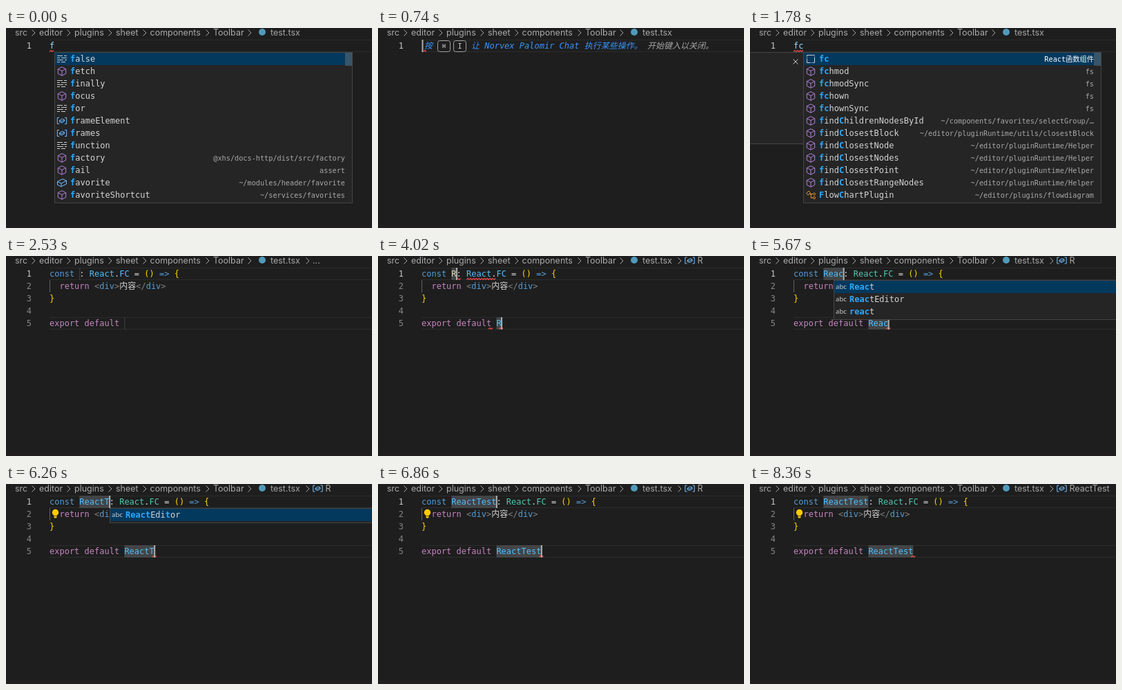
Write an HTML page that moves like this. It is 530 px wide and 291 px high and loops after 8.38 s.

```html
<!DOCTYPE html>
<html lang="zh">
<head>
<meta charset="utf-8">
<title>Snippet completion</title>
<style>
html, body { margin: 0; width: 100%; height: 100%; overflow: hidden; background: #1e1e1e; }
svg { display: block; width: 530px; height: 291px; }
text { white-space: pre; font: 12px "DejaVu Sans Mono", "Noto Sans CJK SC", "Noto Sans CJK", monospace; fill: #d4d4d4; }
.crumb { font: 12.5px Inter, "Open Sans", sans-serif; fill: #a9a9a9; }
.detail { font-size: 10.23px; text-anchor: end; fill: #a8a8a8; }
.abc { font: 9.6px "Noto Sans", sans-serif; fill: #ccc; }
.key { font-size: 10px; text-anchor: middle; fill: #ccc; }
.hint { font-style: italic; }
.match { font-weight: bold; fill: #2aaaff; }
.num { text-anchor: end; }
path { fill: none; }
</style>
</head>
<body>
<svg id="stage" viewBox="0 0 530 291"></svg>
<script>
const CH = 7.224, LEFT = 63, LOOP = 8380;
const BLUE = '#569cd6', CONST = '#4fc1ff', TYPE = '#4ec9b0', PINK = '#c586c0',
      GOLD = '#ffd700', GREY = '#808080', PLAIN = '#d4d4d4';

const lineY = line => 17 + 18 * (line - 1);
const rect = (x, y, w, h, fill, more = '') =>
  `<rect x="${x}" y="${y}" width="${w}" height="${h}" fill="${fill}" ${more}/>`;
const path = (d, color, more = '') => `<path d="${d}" stroke="${color}" ${more}/>`;
const esc = s => s.replace(/&/g, '&amp;').replace(/</g, '&lt;');
const text = (x, y, s, cls = '', fill = '') =>
  `<text x="${x}" y="${y}" class="${cls}" ${fill && `style="fill:${fill}"`}>${esc(s)}</text>`;
const spans = (line, parts) => `<text x="${LEFT}" y="${lineY(line) + 13}">` +
  parts.map(([s, c]) => `<tspan fill="${c}">${esc(s)}</tspan>`).join('') + '</text>';
const cursor = (x, line) => rect(x - .5, lineY(line), 2, 18, '#aeafad');

function squiggle(x1, x2, line) {
  let d = '';
  for (let x = x1, i = 0; x <= x2; x += 2, i++)
    d += `${i ? 'L' : 'M'}${x} ${lineY(line) + (i % 2 ? 15.5 : 17.5)}`;
  return path(d, '#f14c4c', 'stroke-width="1.1"');
}

// Icons are drawn around their centre.
const icons = {
  keyword: path('M-7-4.5h8M3-4.5h4M-7-1.5h4M-1-1.5h8M-7 1.5h9M4 1.5h3M-7 4.5h4M-1 4.5h6', '#ccc'),
  cube: path('M0-6.3L5.7-3.4V3.4L0 6.3-5.7 3.4V-3.4ZM-5.7-3.4L0-.5 5.7-3.4M0-.5V6.3', '#b180d7'),
  field: path('M-6.5-1.5L1-5.3 6.5-2.8V2L-1 5.7-6.5 3.2ZM-6.5-1.5L-1 1.2 6.5-2.8M-1 1.2V5.7', '#75beff'),
  variable: path('M-4-4.5H-6.7V4.5H-4M4-4.5H6.7V4.5H4M-3.5-.3L.5-2.8 3.5-1.4V.8L-.5 3-3.5 1.6ZM-3.5-.3L-.5 1 3.5-1.4', '#75beff'),
  snippet: path('M-5.5-5.5H5.5V5.5H-5.5Z', '#ccc', 'stroke-dasharray="9 0 2 1 1 1"'),
  class: path('M-6.5-2.5L-3-5.8-.3-3.2-3.8 0ZM-2-1.5H3M.3-1.5V4H3M3-1.5L5-3.3 7-1.4 5 .5ZM3 4L5 2.2 7 4.1 5 6Z', '#ee9d28')
};
const icon = (name, x, y) => name === 'abc'
  ? text(x - 8, y + 3, 'abc', 'abc')
  : `<g transform="translate(${x} ${y})">${icons[name]}</g>`;

// Labels mark the matched letters with asterisks.
function popup(x, items) {
  const h = items.length * 18;
  let s = rect(x, 35.5, 431, h + 3, '#252526', 'stroke="#454545"') + rect(x + .5, 36, 430, 18, '#04395e');
  items.forEach(([kind, label, detail], i) => {
    const y = 45 + 18 * i;
    s += icon(kind, x + 10.5, y) + `<text x="${x + 22.5}" y="${y + 4}">` +
      label.split('*').map((p, j) => `<tspan class="${j % 2 ? 'match' : ''}">${p}</tspan>`).join('') + '</text>';
    if (detail) s += text(x + 420.5, y + 3.5, detail, 'detail', i ? '' : '#fff');
  });
  return s;
}
const slider = (x, opacity) => rect(x + 420.5, 36, 10, 19, '#797979', `opacity="${opacity}"`);

const rows = (kind, list) => list.split(' ').map(label => [kind, label]);

const fItems = [
  ['keyword', '*f*alse'], ['cube', '*f*etch'], ['keyword', '*f*inally'], ['cube', '*f*ocus'],
  ['keyword', '*f*or'], ['variable', '*f*rameElement'], ['variable', '*f*rames'], ['keyword', '*f*unction'],
  ['cube', '*f*actory', '@xhs/docs-http/dist/src/factory'], ['cube', '*f*ail', 'assert'],
  ['field', '*f*avorite', '~/modules/header/favorite'], ['cube', '*f*avoriteShortcut', '~/services/favorites']
];
const helper = '~/editor/pluginRuntime/Helper';
const fcItems = [
  ['snippet', '*fc*', 'React函数组件'],
  ...['hmod', 'hmodSync', 'hown', 'hownSync'].map(s => ['cube', '*fc*' + s, 'fs']),
  ['cube', '*f*ind*C*hildrenNodesById', '~/components/favorites/selectGroup/…'],
  ['cube', '*f*ind*C*losestBlock', '~/editor/pluginRuntime/utils/closestBlock'],
  ...['Node', 'Nodes', 'Point', 'RangeNodes'].map(s => ['cube', '*f*ind*C*losest' + s, helper]),
  ['class', '*F*low*C*hartPlugin', '~/editor/plugins/flowdiagram']
];
const reItems = rows('abc', '*Re*act *Re*actEditor *Re*cord *Re*nder *Re*nderPlugin *Re*quired ' +
  '*re*act *re*ad *re*ason *re*covery *re*coverySheet *re*coverySheetFromLocalSnapshot');
const reaItems = rows('abc', '*Rea*ct *Rea*ctEditor *rea*ct *rea*d *rea*son');
const reacItems = rows('abc', '*Reac*t *Reac*tEditor *reac*t');
const reactItems = rows('abc', '*React* *React*Editor *react*');
const tItems = rows('abc', '*React*Edi*t*or');

function frame(body, lines, active, crumb) {
  let s = rect(0, 0, 530, 291, '#1e1e1e') + rect(0, 286, 530, 5, '#211e1f');
  const names = { src: 13, editor: 48, plugins: 99, sheet: 159, components: 208.5, Toolbar: 300, 'test.tsx': 383 };
  for (const n in names) s += text(names[n], 11, n, 'crumb');
  const arrows = [40, 91, 151, 201, 292, 353];
  if (crumb) arrows.push(437);
  for (const x of arrows) s += path(`M${x - 2.5} 2.5l4.5 4.5-4.5 4.5`, '#a9a9a9');
  s += '<circle cx="371" cy="6" r="5" fill="#519aba"/>';
  if (crumb === '…') s += text(444, 11, '...', 'crumb');
  else if (crumb) s += icon('variable', 451.5, 6.5) + text(462.5, 11, crumb, 'crumb');
  for (const n of active)
    s += path(`M${LEFT} ${lineY(n) + .5}H530M${LEFT} ${lineY(n) + 17.5}H530`, '#2c2c2c');
  for (let n = 1; n <= lines; n++)
    s += text(37, lineY(n) + 13, String(n), 'num', n === 1 ? '#c6c6c6' : '#858585');
  return s + body;
}

function typed(word, on, extra = '') {
  const end = LEFT + word.length * CH;
  return frame(spans(1, [[word, '#9cdcfe']]) + squiggle(LEFT, end, 1) +
    (on ? cursor(end, 1) : '') + extra, 1, [1]);
}

function emptyHint() {
  const key = (x, s) => rect(x, 18.5, 18, 16, 'none', 'rx="3" stroke="#a0a0a0"') + text(x + 9, 30, s, 'key');
  return frame(
    text(67, 30, '按', 'hint', '#3794ff') + key(86.5, '⌘') + key(109.5, 'I') +
    text(135, 30, '让 Norvex Palomir Chat 执行某些操作。', 'hint', '#3794ff') +
    text(390, 30, '开始键入以关闭。', 'hint', '#a6a6a6') +
    squiggle(66, 70, 1) + cursor(64, 1), 1, [1]);
}

const docs = rect(-1, 35.5, 78.5, 133, '#252526', 'stroke="#454545"') + path('M62.5 45.5l7 7m0-7l-7 7', '#ccc');
const bulb = '<circle cx="71.5" cy="41.5" r="4.7" fill="#fc0"/>' + rect(69.5, 45, 4, 4.5, '#fc0', 'rx="1"') +
  path('M69.5 46.8h4', '#1e1e1e', 'stroke-width=".7"');

function code(name, { on = true, crumb = 'R', broken = false, marks, list = '', lamp = false } = {}) {
  const w = name.length * CH, a = LEFT + 6 * CH, b = LEFT + 15 * CH, end = b + w;
  const mark = (x, n) => rect(x, lineY(n), Math.max(w, 1), 18, '#434446');
  return frame(
    mark(a, 1) + mark(b, 5) + rect(63, lineY(2), 1, 18, '#606060') +
    spans(1, [['const ', BLUE], [name, broken ? '#dcdcaa' : CONST], [': ', PLAIN],
      ['React', broken ? CONST : TYPE], ['.', PLAIN], ['FC', broken ? CONST : TYPE],
      [' = ', PLAIN], ['()', GOLD], [' => ', BLUE], ['{', GOLD]]) +
    spans(2, [['  return ', PINK], ['<', GREY], ['div', BLUE], ['>', GREY], ['内容', PLAIN],
      ['</', GREY], ['div', BLUE], ['>', GREY]]) +
    spans(3, [['}', GOLD]]) +
    spans(5, [['export default ', PINK], [name, CONST]]) +
    (marks ?? squiggle(end - 3, end + 3, 5)) +
    (on ? cursor(a + w, 1) + cursor(end, 5) : '') +
    (lamp ? bulb : '') + list, 5, [1, 5], crumb);
}

const errors = shift => squiggle(106.5 + shift, 113 + shift, 1) +
  squiggle(121 + shift, 164 + shift, 1) + squiggle(160, 167, 5);
const bare = { broken: true, crumb: '…' };
const tail = squiggle(175, 181, 5);
const fList = popup(70.5, fItems), reList = popup(121.5, reItems);
const fcList = docs + popup(77.5, fcItems) + slider(77.5, .45);

const steps = [
  [0, typed('f', false, fList + slider(70.5, .45))],
  [300, typed('f', true, fList + slider(70.5, .2))],
  [440, typed('f', true, fList)],
  [740, emptyHint()],
  [1040, typed('f', true)],
  [1180, typed('fc', true)],
  [1330, typed('fc', true, fcList)],
  [1780, typed('fc', false, fcList)],
  [2080, code('', { broken: true, crumb: '', marks: '' })],
  [2530, code('', { ...bare, on: false, marks: '' })],
  [2980, code('', { ...bare, marks: '' })],
  [3130, code('', { ...bare, marks: errors(0) + squiggle(128, 230, 2) })],
  [3430, code('R', { ...bare, marks: errors(CH) })],
  [3880, code('R', { broken: true, marks: errors(CH) })],
  [4020, code('R', { broken: true, marks: errors(CH) + tail })],
  [4320, code('Re')],
  [4470, code('Re', { list: reList })],
  [4920, code('Re', { list: reList, on: false })],
  [5070, code('Re', { list: reList })],
  [5520, code('Rea', { list: popup(121.5, reaItems) })],
  [5670, code('Reac', { list: popup(121.5, reacItems) })],
  [5820, code('React', { list: popup(143.5, reactItems) })],
  [6110, code('ReactT', { lamp: true })],
  [6260, code('ReactT', { lamp: true, list: popup(150.5, tItems) })],
  [6410, code('ReactTe', { lamp: true })],
  [6560, code('ReactTes', { lamp: true })],
  [6860, code('ReactTest', { lamp: true })],
  [7310, code('ReactTest', { lamp: true, crumb: 'ReactTest', on: false })],
  [7910, code('ReactTest', { lamp: true, crumb: 'ReactTest' })],
  [8360, code('ReactTest', { lamp: true, crumb: 'ReactTest', on: false })]
];

const stage = document.getElementById('stage');
let shown;
function draw() {
  const t = performance.now() % LOOP;
  const step = steps.findLast(([at]) => at <= t);
  if (step !== shown) stage.innerHTML = step[1];
  shown = step;
  requestAnimationFrame(draw);
}
draw();
</script>
</body>
</html>
```
